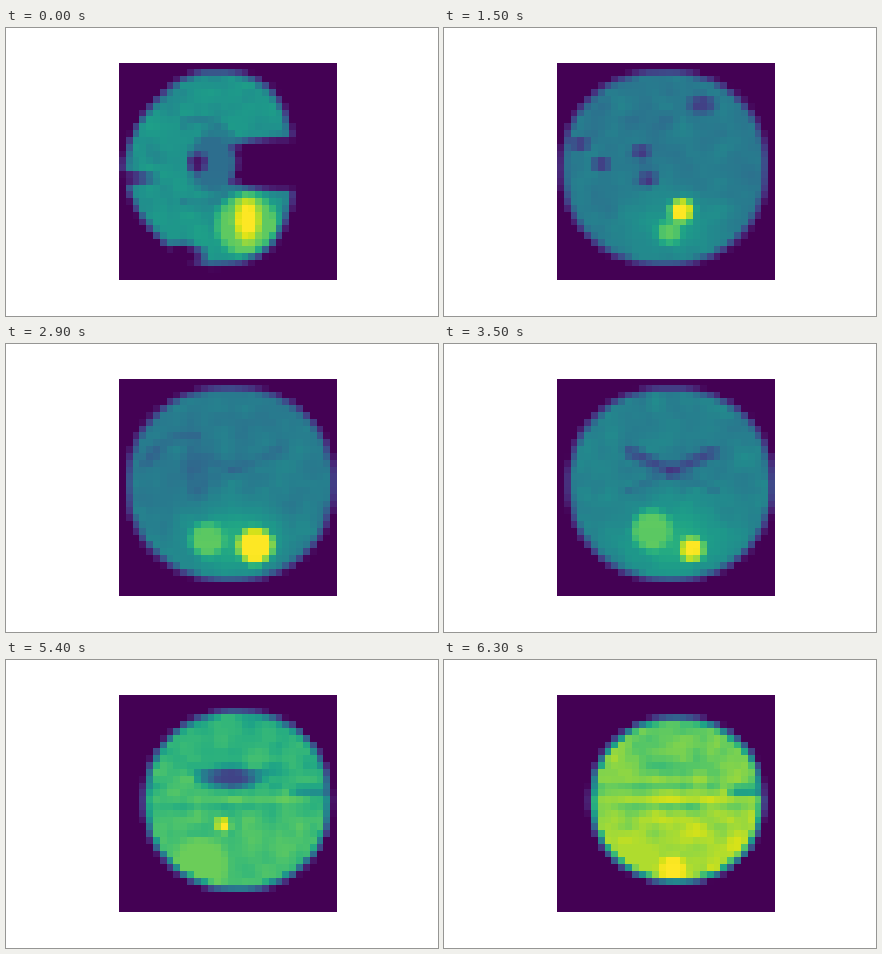
These frames come from a looping animation (432x288 px, 6400 ms). A matplotlib script:

```python
import numpy as np
import matplotlib.pyplot as plt
from matplotlib.animation import FuncAnimation

N = 32            # cells per side
SLICES = 64
STEM = (11.5, 14.8)
MID = (16.8, 13.6)

yy, xx = np.mgrid[0:N, 0:N] + 0.5

# The lesion's path through the slices: slice, x, y, ring radius, thickness.
CORE = np.array([(0, 18.8, 23.2, 0, 1.8), (15, 18.3, 21.8, 0, 1.7),
                 (23, 20.2, 24, 2.4, 1.1), (35, 19.8, 25.2, 0, 1.7),
                 (44, 14.8, 23, 3.1, 1.3), (54, 15.3, 19.2, 0, 0.9),
                 (63, 17, 25.8, 0, 2)])
# Its duller neighbour: slice, x, y, radius.
LOBE = np.array([(0, 18.8, 24, 4.5), (15, 16.5, 25, 1.6), (23, 12, 25, 2),
                 (35, 13.9, 22.4, 2.9), (44, 14, 25.6, 2.4), (54, 12, 25, 4)])


def track(path, i):
    return [np.interp(i, path[:, 0], col) for col in path[:, 1:].T]


def near(i, center, span):
    return np.exp(-((i - center) / span) ** 2)


def soft(depth):
    """Turn depth inside a shape, in cells, into coverage."""
    return np.clip(0.5 + depth / 1.3, 0, 1)


def dist(x, y, rx=1, ry=1):
    return np.hypot((xx - x) / rx, (yy - y) / ry)


def ellipse(x, y, rx, ry):
    return soft((1 - dist(x, y, rx, ry)) * min(rx, ry))


def capsule(x0, y0, x1, y1, width):
    dx, dy = x1 - x0, y1 - y0
    t = ((xx - x0) * dx + (yy - y0) * dy) / (dx * dx + dy * dy)
    t = np.clip(t, 0, 1)
    return soft(width - dist(x0 + t * dx, y0 + t * dy))


def ring(x, y, r, width):
    return soft(width - np.abs(dist(x, y) - r))


def paint(v, mask, value):
    return v + (value - v) * mask


def head(i, early, rise):
    """Silhouette: a superellipse, bitten open in the first slices."""
    left = 0.9 + 4.3 * rise ** 1.4
    right = 31.4 - 1.4 * ((i - 36) / 27) ** 2 - 3.6 * early
    top = 1.5 + 2.2 * rise ** 2.5
    bottom = 29.6 - 2.2 * rise ** 3
    cx, cy = (left + right) / 2, (top + bottom) / 2
    rx, ry = (right - left) / 2, (bottom - top) / 2
    n = 2.15 + 0.5 * early * np.sign(xx - cx)
    d = (np.abs((xx - cx) / rx) ** n + np.abs((yy - cy) / ry) ** n) ** (1 / n)
    mask = np.clip(0.55 + (1 - d) * min(rx, ry) / 1.5, 0, 1)
    if early:
        gap = min(1, 3 * early)
        for x, y, w, h in [(24 + 9 * (1 - early), 15, 10, 4),
                           (0.8, 17, 3.4, 0.9), (9.2, 28.4, 3, 1.6)]:
            mask = mask * (1 - gap * ellipse(x, y, w * early, h * early))
        mask = np.maximum(mask, early * ellipse(*STEM, 5.6, 5.6))
    return mask


def brainstem(v, early):
    groove = ring(*STEM, 6.2, 0.5) * (xx > 9)
    v = paint(v, 0.8 * early * groove, 0.37)
    v = paint(v, early * ellipse(13.8, 14.8, 3.5, 4.5), 0.36)
    return paint(v, early * ellipse(*STEM, 1.3, 1.3), 0.05)


def fluid(v, i):
    """Dark spaces: pits and an arc low down, then the ventricles."""
    for x, y in [(3.3, 12), (6.5, 15), (13.3, 17.2), (12.3, 13.1)]:
        v = paint(v, near(i, 15, 4) * ellipse(x, y, 1.2, 0.9), 0.14)
    v = paint(v, near(i, 18, 5) * ellipse(21.3, 6.2 - 0.4 * (i - 15), 1.8, 1.3),
              0.1)
    arc = ring(10.5, 16, 7.4, 0.7) * (xx < 12.3) * (yy < 13)
    v = paint(v, near(i, 23, 5) * arc, 0.14)
    v = paint(v, near(i, 23, 5) * ellipse(11.5, 15, 1.6, 2.8), 0.12)
    for side in (-1, 1):
        horn = capsule(*MID, MID[0] + 6 * side, 10.9, 0.8)
        leg = capsule(*MID, MID[0] + 6.5 * side, 16.6, 0.3)
        v = paint(v, near(i, 41, 9) * horn, 0.1)
        v = paint(v, 0.7 * near(i, 41, 8) * leg, 0.2)
    body = ellipse(16.4, 13.5 - 0.14 * (i - 44), 4, 1.3)
    return paint(v, near(i, 50, 9) * body, 0.1)


def lesion(v, i, base, early):
    glow = np.exp(-dist(17.3, 24, 7, 5) ** 2)
    v = paint(v, near(i, 32, 26) * glow, max(0.63, base))
    x, y, r = track(LOBE, i)
    v = paint(v, soft(r - dist(x, y)), max(0.75, base + 0.06))
    x, y, r, width = track(CORE, i)
    d = dist(x, y, 1, 1 + 0.7 * early)
    hot = soft(width - np.abs(d - r))
    # The ring opens to the right into a C.
    opening = xx - x > np.abs(yy - y)
    return paint(v, hot * (1 - 0.7 * near(i, 44, 5) * opening), 1)


def grain():
    """Tissue texture, slightly smoothed within and across slices."""
    g = np.random.default_rng(4).normal(0, 0.16, (SLICES, N, N))
    for axis in range(3):
        g = 0.5 * g + 0.25 * (np.roll(g, 1, axis) + np.roll(g, -1, axis))
    return g


texture = grain()


def slice_at(i):
    early = max(0, 1 - i / 12)
    rise = max(0, (i - 20) / 43)
    late = max(0, (i - 23) / 40) ** 2
    base = 0.41 + 0.41 * late + 0.11 * early

    v = base + 0.09 * late * (yy - 15.5) / 12
    v = v * (1 + texture[i])
    v = brainstem(v, early)
    v = lesion(v, i, base, early)
    v = fluid(v, i)
    # Folds along the midline, with the fissure entering from the right.
    folds = np.cos(2 * np.pi * (yy - 15.2) / 3.2) * np.exp(-dist(17, 15.2, 9, 2.5) ** 2)
    v = v + 0.12 * late * folds
    fissure = capsule(26, 14.2, N, 14.2, 0.3)
    v = paint(v, np.clip((i - 25) / 30, 0, 1) * fissure, 0.33)

    data = np.clip(v, 0, 1) * head(i, early, rise)
    return data / data.max()


fig = plt.figure(figsize=(6, 4), dpi=72, facecolor="white")
ax = fig.add_axes([0.125, 0.125, 0.775, 0.755])
ax.axis("off")
image = ax.imshow(slice_at(0), cmap="viridis", vmin=0, vmax=1,
                  interpolation="nearest")


def update(i):
    image.set_data(slice_at(i))
    return [image]


anim = FuncAnimation(fig, update, frames=SLICES, interval=100, repeat=True,
                     repeat_delay=0)
plt.show()
```
